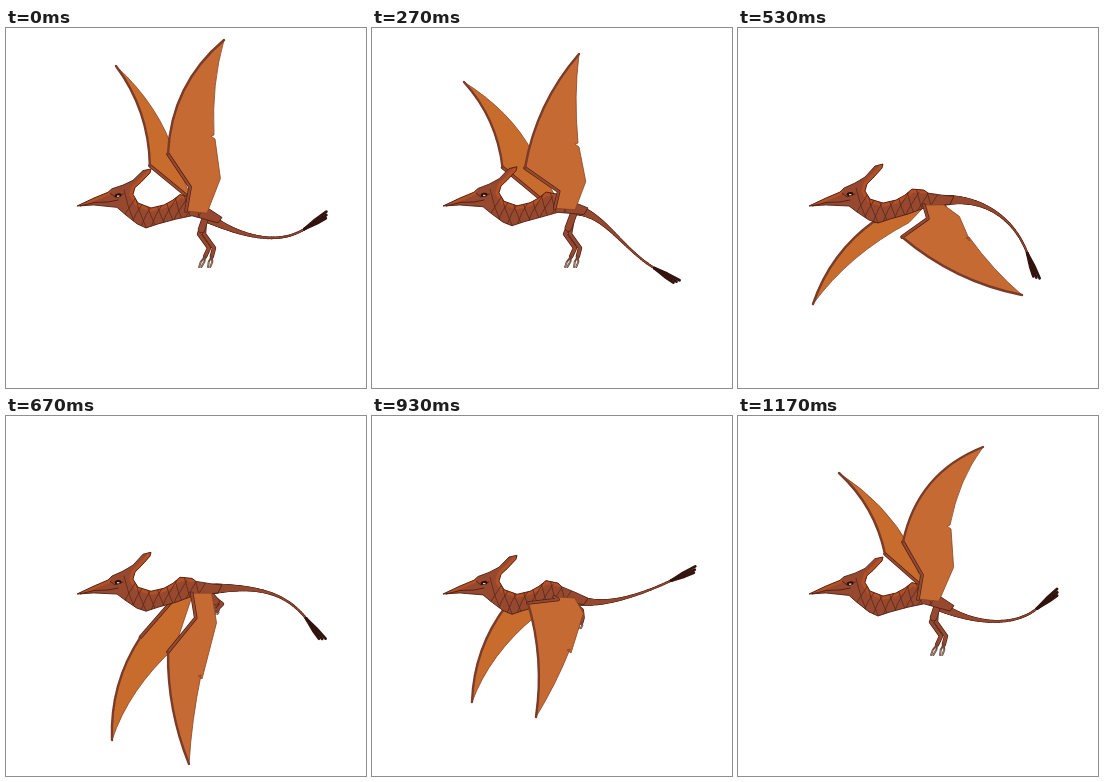
An HTML page with a canvas for the animation above (1.21 s loop, 360 by 360 pixels).

```html
<!DOCTYPE html>
<html>
<head>
<meta charset="utf-8">
<title>Flying pterosaur</title>
<style>
html, body { margin: 0; height: 100%; overflow: hidden; background: #fff; }
canvas { display: block; width: 100vw; height: 100vh; }
</style>
</head>
<body>
<canvas id="stage" width="360" height="360"></canvas>
<script>
const ctx = document.getElementById('stage').getContext('2d');
const LOOP = 1210, POSES = 30;
const DARK = '#4c2018', EDGE = '#7a3b28', SKIN = '#96492e', ORANGE = '#b55024';

// The flap: [pose, x, y], and for the near tip also how far its leading edge bows.
const WRIST = [[0,162,126], [6,153,140], [10,145,180], [13,164,209], [16,162,236], [23,156,187], [27,163,138], [29,165,126]];
const NOTCH = [[0,208,107], [6,206,115], [10,222,170], [13,231,209], [16,195,259], [23,198,233], [27,214,130], [29,212,109]];
const NEAR_TIP = [[0,218,12,.22], [6,207,26,.14], [10,275,165,-.21], [13,284,267,-.13], [14,254,322,-.12],
  [16,183,348,-.1], [23,164,301,.11], [27,262,72,.27], [29,245,31,.27]];
const FAR_TIP = [[0,110,38], [6,92,54], [10,59,164], [13,75,276], [14,85,303], [16,106,324], [23,100,286], [27,88,88], [29,101,57]];

// Beak, crest, neck, back, then the belly back to the beak.
const BODY = [[71,178], [88,170], [102,164], [106,160], [117,155], [127,149], [137,138], [145,136],
  [144,140], [135,150], [129,156], [127,163], [132,171], [145,175], [158,172], [167,167], [174,161],
  [186,162], [190,165], [204,167], [216,168], [212,176], [186,180], [170,186], [152,191], [140,195],
  [131,192], [119,184], [111,178], [88,177]];

const clamp = (v, low, high) => Math.min(high, Math.max(low, v));
const mix = (a, b, u) => a.map((v, i) => v + (b[i] - v) * u);
const move = ([x, y], dx, dy) => [x + dx, y + dy];
const polar = ([x, y], angle, r) => [x + r * Math.cos(angle), y + r * Math.sin(angle)];
const wave = (n, peak) => Math.cos((n - peak) / POSES * 2 * Math.PI);

// Periodic Hermite curve through the rows of a track.
function sample(track, n) {
  const count = track.length;
  const row = i => track[(i + count) % count];
  const key = i => row(i)[0] + POSES * Math.floor(i / count);
  const i = track.findLastIndex(r => r[0] <= n);
  const span = key(i + 1) - key(i), u = (n - key(i)) / span;
  const ease = u * u * (3 - 2 * u);
  return row(i).slice(1).map((from, d) => {
    const to = row(i + 1)[d + 1];
    const slope = j => (row(j + 1)[d + 1] - row(j - 1)[d + 1]) / (key(j + 1) - key(j - 1));
    return from + (to - from) * ease +
      span * u * (1 - u) * (slope(i) * (1 - u) - slope(i + 1) * u);
  });
}

function polyline(points) {
  const path = new Path2D();
  points.forEach(p => path.lineTo(...p));
  return path;
}
function stroke(path, color, width) {
  ctx.strokeStyle = color;
  ctx.lineWidth = width;
  ctx.stroke(path);
}
function outlined(points, width) {
  const path = polyline(points);
  stroke(path, DARK, width + 1.4);
  stroke(path, SKIN, width);
}

// The trailing edge follows the bow of the leading edge by the share `follow`.
function drawWing(arm, tip, rest, bow, follow, color) {
  const wrist = arm.at(-1);
  const dx = (tip[1] - wrist[1]) * bow, dy = (wrist[0] - tip[0]) * bow;
  const front = move(mix(wrist, tip, .5), dx, dy);
  const back = move(mix(tip, rest[0], .5), dx * follow, dy * follow);
  const membrane = polyline(arm);
  membrane.quadraticCurveTo(...front, ...tip);
  membrane.quadraticCurveTo(...back, ...rest[0]);
  rest.slice(1).forEach(p => membrane.lineTo(...p));
  membrane.closePath();
  ctx.fillStyle = color;
  ctx.fill(membrane);
  stroke(membrane, '#8a4524', .8);
  outlined(arm, 2.2);
  const edge = polyline([wrist]);
  edge.quadraticCurveTo(...front, ...tip);
  stroke(edge, EDGE, 2.4);
}

function drawTail(root, sway, drop) {
  const chord = (15 + 27 * sway) * Math.PI / 180;
  const curl = chord + .65 - 1.35 * drop;
  const end = polar(root, chord, 97);
  const c1 = move(root, 38 - 16 * drop, 16 * drop - 3), c2 = polar(end, curl, -37);
  const point = u => {
    const a = mix(root, c1, u), b = mix(c1, c2, u), c = mix(c2, end, u);
    return mix(mix(a, b, u), mix(b, c, u), u);
  };
  for (const [color, extra] of [[DARK, 1.2], [SKIN, 0]]) {
    for (let u = 0; u < 1; u += .025) {
      stroke(polyline([point(u), point(u + .025)]), color, 1.1 + 8 * (1 - u) ** 3 + extra);
    }
  }
  for (let k = -1; k <= 1; k++) {
    stroke(polyline([end, polar(end, curl + k * .14, 14), polar(end, curl + k * .1, 26 - 2 * k)]), '#32130e', 2.8);
  }
}

function drawLegs(hip, reach) {
  const joint = (tucked, stretched) => mix(tucked, stretched, reach);
  const knee = joint([212, 188], [194, 206]);
  const ankle = joint([208, 192], [204, 220]);
  const toe = joint([203, 198], [196, 239]);
  for (const side of [4, -1]) {
    const heel = move(ankle, side, 0), claw = move(toe, side * 1.8, 0);
    const foot = mix(heel, claw, .45);
    outlined([hip, move(knee, side, 0), heel, foot], 3);
    for (const spread of [-1.8, 1.8]) {
      const mid = move(mix(foot, claw, .5), spread, 0), end = move(claw, spread * .6, 0);
      stroke(polyline([foot, mid, end]), '#704634', 2);
      stroke(polyline([mid, end]), '#8f827a', 1);
    }
  }
  outlined([hip, mix(hip, knee, .7)], 6);
}

function drawBody(drop) {
  // The rump sinks most, the beak stays in place.
  const sink = ([x, y]) =>
    [x, y + drop * (clamp((x - 100) / 8, 0, 5) + 16 * Math.max(0, (x - 165) / 50) ** 2)];
  const points = BODY.map(sink);
  const shape = polyline(points);
  shape.closePath();
  ctx.fillStyle = SKIN;
  ctx.fill(shape);
  ctx.save();
  ctx.clip(shape);
  stroke(polyline(points.slice(7, 18)), ORANGE, 7);
  stroke(polyline(points.slice(0, 3)), ORANGE, 6);
  for (let x = 118; x < 190; x += 10) {
    stroke(polyline([[x, 160], [x + 5, 178], [x + 16, 204]].map(sink)), '#5b281b', .8);
    stroke(polyline([[x + 13, 164], [x + 2, 182], [x - 7, 204]].map(sink)), '#5b281b', .8);
  }
  ctx.restore();
  stroke(shape, DARK, .9);
  stroke(polyline([[74, 178], [88, 174.5], [102, 174], [112, 172]]), DARK, .9);
  stroke(polyline([[104, 165], [109, 169], [117, 166]]), DARK, .9);
  const [x, y] = sink([112, 166]);
  ctx.fillStyle = '#2b100c';
  ctx.beginPath();
  ctx.ellipse(x, y, 3.4, 2, -.2, 0, 7);
  ctx.fill();
  ctx.fillStyle = '#e0cfba';
  ctx.fillRect(x - 1, y, 2.4, 1.3);
}

function draw(n) {
  const drop = .5 + .5 * wave(n, -1);
  const sway = wave(n, 9);
  const reach = clamp(.65 + .75 * wave(n, 2.5), 0, 1);
  const between = (raised, sunk) => mix(raised, sunk, drop);
  const wrist = sample(WRIST, n), notch = sample(NOTCH, n);
  const [tipX, tipY, bow] = sample(NEAR_TIP, n);

  ctx.fillStyle = '#fff';
  ctx.fillRect(0, 0, 360, 360);

  const farWrist = move(wrist, 10 * drop - 28, 28 * drop - 16);
  const farBase = move(wrist, 7, -3 - 17 * sway);
  drawWing([between([166, 185], [180, 167]), farWrist], sample(FAR_TIP, n),
    [farBase, between([187, 178], [185, 170])], -.16, .9, '#c86c2e');

  drawTail(between([208, 172], [202, 190]), sway, drop);
  drawLegs(between([205, 179], [199, 191]), reach);
  drawBody(drop);

  const shoulder = between([186, 177], [180, 183]);
  const elbow = move(shoulder, 4, .42 * (wrist[1] - shoulder[1]));
  const corner = [152 + .3 * notch[0], 111 + .37 * notch[1]];
  drawWing([shoulder, elbow, wrist], [tipX, tipY],
    [notch, move(notch, -3, 1), move(notch, 1, 4), corner, between([206, 177], [201, 185])],
    bow, .3, '#c66a33');
}

// 25 poses a second shown on a 30 Hz grid: the first slot of every six is held.
function frame(now) {
  const slot = Math.min(35, Math.floor((now % LOOP + 3.4) * 3 / 100));
  draw(5 * Math.floor(slot / 6) + Math.max(0, slot % 6 - 1));
  requestAnimationFrame(frame);
}
ctx.lineJoin = ctx.lineCap = 'round';
requestAnimationFrame(frame);
</script>
</body>
</html>
```
